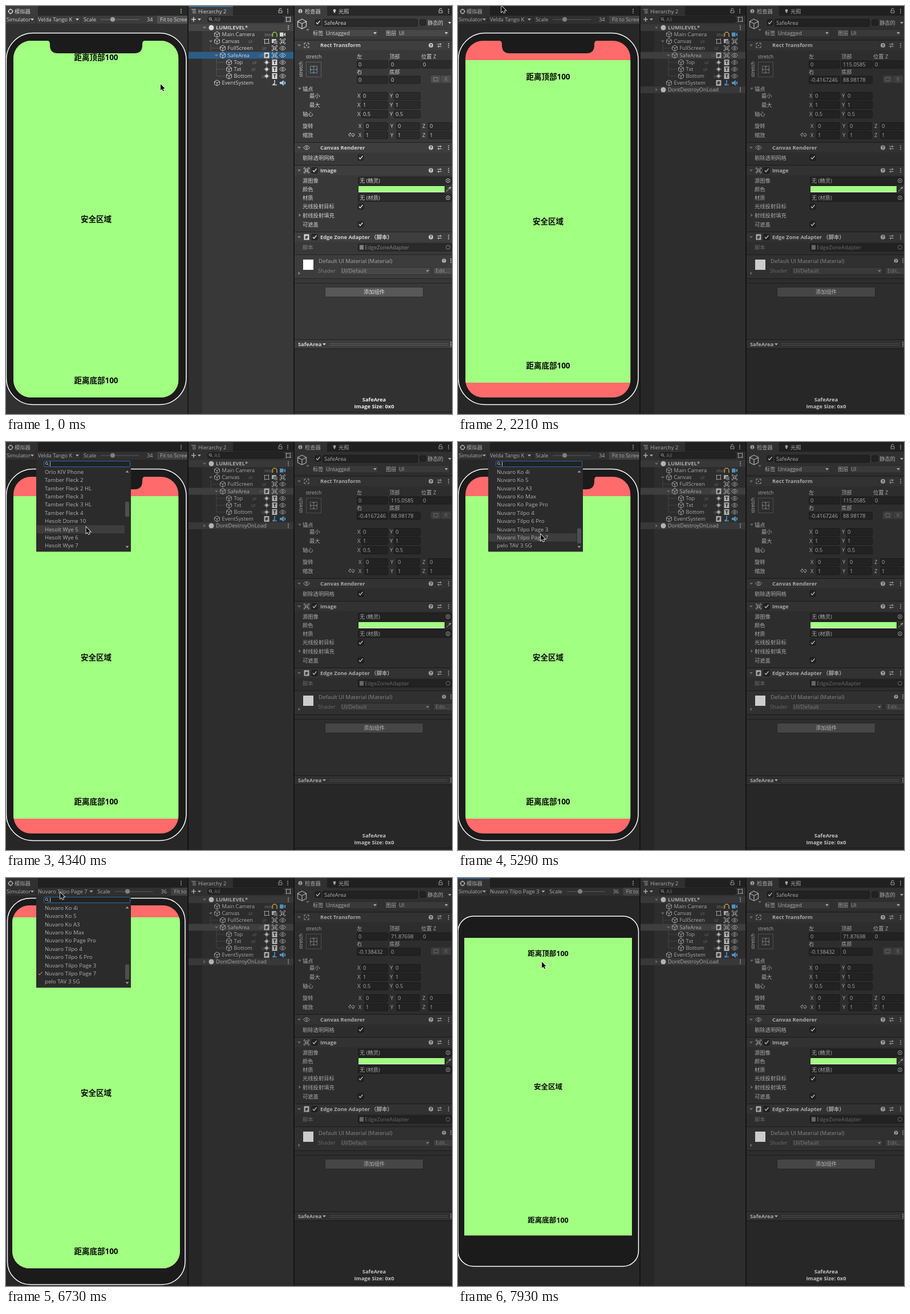
These frames come from a looping animation (782 px wide and 716 px high, 8000 ms). An HTML page with a canvas:

```html
<!DOCTYPE html>
<html lang="zh">
<head>
<meta charset="utf-8">
<style>
html, body { margin: 0; width: 100%; height: 100%; overflow: hidden; background: #191919; }
canvas { display: block; }
</style>
</head>
<body>
<canvas id="stage" width="782" height="716"></canvas>
<script>
const g = document.getElementById('stage').getContext('2d');
const FONT = "'Open Sans', 'Noto Sans CJK SC', 'Noto Sans CJK', sans-serif";
const GREEN = '#a1ff81', RED = '#ff6b6b', BODY = '#1b1b1b', INK = '#d2d2d2', DIM = '#848484';

const ICON = {
  cube: 'M0-5L4.5-2.5V2.5L0 5L-4.5 2.5V-2.5ZM-4.5-2.5L0 0L4.5-2.5M0 0V5',
  eye: 'M-5.5 0Q0-7 5.5 0Q0 7-5.5 0ZM1.5 0A1.5 1.5 0 1 1-1.5 0A1.5 1.5 0 1 1 1.5 0',
  image: 'M-4.5-2V-4.5H-2M2-4.5H4.5V-2M4.5 2V4.5H2M-2 4.5H-4.5V2M-2.5-2.5H2.5V2.5H-2.5ZM-2 2L0-1L2 2',
  lock: 'M-3 0H3V4H-3ZM-2 0V-2A2 2 0 0 1 2-2',
  dots: 'M-.8-4h1.6v1.7h-1.6zM-.8-.8h1.6v1.7h-1.6zM-.8 2.4h1.6v1.7h-1.6z',
  check: 'M-3 0L-1 2.5L3.5-3',
  down: 'M-3-1.5H3L0 2Z', right: 'M-1.5-3V3L2 0Z', up: 'M-3 1.5H3L0-2Z',
  sliders: 'M-4-2H4M-4 2H4M1.5-4V0M-1.5 0V4',
  find: 'M1.2-1A2 2 0 1 1-2.8-1A2 2 0 1 1 1.2-1M.6.6L3 3',
  rect: 'M-2-2H2V2H-2ZM-5 0H-2M2 0H5M0-5V-2M0 2V5',
  frame: 'M-3.5-3.5H3.5V3.5H-3.5ZM-5-3.5H-2M3.5-5V-2M5 3.5H2M-3.5 5V2',
  ears: 'M-4 3V0A4 4 0 0 1 4 0V3M-4 .5V4M4 .5V4',
  camera: 'M-5-3.5H1.5V3.5H-5ZM2.5-1L5-3.5V3.5L2.5 1Z',
  speaker: 'M-5-2H-2L2-5V5L-2 2H-5ZM3-2.5H5V2.5H3Z',
  stick: 'M0-4V2M-4 3.5H4M-1-4H1M-3 2H0',
  ring: 'M3.5 0A3.5 3.5 0 1 1-3.5 0A3.5 3.5 0 1 1 3.5 0',
  spread: 'M-4-4L-1-4M-4-4V-1M4-4H1M4-4V-1M-4 4H-1M-4 4V1M4 4H1M4 4V1M-.5-.5H.5V.5H-.5Z',
  link: 'M-1-2H-3A2 2 0 0 0-3 2H-1M1-2H3A2 2 0 0 1 3 2H1M-3-4L3 4'
};

const box = (x, y, w, h, color) => { g.fillStyle = color; g.fillRect(x, y, w, h); };

function round(x, y, w, h, r, fill, stroke, width = 1) {
  g.beginPath();
  g.roundRect(x, y, w, h, r);
  if (fill) { g.fillStyle = fill; g.fill(); }
  if (stroke) { g.strokeStyle = stroke; g.lineWidth = width; g.stroke(); }
}

function text(s, x, y, color = INK, size = 9.3, style = '', align = 'left') {
  g.font = `${style} ${size}px ${FONT}`;
  g.textAlign = align;
  g.fillStyle = color;
  g.fillText(s, x, y + size * .36);
}
const bold = (s, x, y, color) => text(s, x, y, color, 9.3, 'bold');

function shape(d, x, y, fill, stroke, width = 1) {
  g.save();
  g.translate(x, y);
  const p = new Path2D(d);
  if (stroke) { g.strokeStyle = stroke; g.lineWidth = width; g.stroke(p); }
  if (fill) { g.fillStyle = fill; g.fill(p); }
  g.restore();
}
const solid = (name, x, y, color = INK) => shape(ICON[name], x, y, color);
const line = (name, x, y, color = '#c4c4c4', width = 1) => shape(ICON[name], x, y, null, color, width);

function badge(s, x, y) {
  box(x - 4.5, y - 5, 9, 10, '#d8d8d8');
  text(s, x, y, '#222', 9, 'bold', 'center');
}

function check(x, y, on = true) {
  round(x - 5, y - 5, 10, 10, 2, '#2a2a2a', '#1c1c1c');
  if (on) line('check', x, y, '#e0e0e0', 1.4);
}

function field(x, y, w, s, color) {
  round(x + .5, y - 6.5, w - 1, 13, 2, '#2a2a2a', '#202020');
  text(s, x + 3, y, color);
}

function popup(x, y, w, s, color = INK) {
  round(x + .5, y - 6.5, w - 1, 13, 2, '#474747', '#303030');
  text(s, x + 3, y, color);
  solid('down', x + w - 6, y, color);
}

// Scrollable device list
const devices = ['Velda Tango K', 'Velda Tango KR', 'Velda Tango KT', 'Velda Tango KT Max',
  'Velda Chip Pouch 6th Gen', 'Velda Chip Pouch 7th Gen', 'Orlo KIV Phone',
  'Tamber Fleck 2', 'Tamber Fleck 2 HL', 'Tamber Fleck 3', 'Tamber Fleck 3 HL', 'Tamber Fleck 4', 'Hesolt Dome 10'];
for (const series of ['Hesolt Wye', 'Morvane Gil', 'Sundarq Halo'])
  for (let n = 5; n < 9; n++) devices.push(`${series} ${n}`);
for (const model of ['Ko 4i', 'Ko 5', 'Ko A3', 'Ko Max', 'Ko Page Pro', 'Tilpo 4', 'Tilpo 6 Pro', 'Tilpo Page 3', 'Tilpo Page 7'])
  devices.push(`Nuvaro ${model}`);
devices.push('pelo TAV 3 5G');

// body and screen: x, y, w, h, radius; safe: top and bottom edge
const phones = [
  { item: 0, body: [.5, 47.5, 315.5, 652, 47], screen: [13, 61, 289.5, 626, 31], safe: [95, 661],
    notch: 'M71 60Q77 61 77 67V69Q77 83 91 83H225Q239 83 239 69V67Q239 61 245 60Z',
    size: 13.5, gap: 29.5, shift: 0, knob: 187, scale: 34 },
  { item: 33, body: [2.5, 35.5, 311.5, 678, 40], screen: [11, 48, 294, 637, 30], safe: [69, 685],
    notch: 'M138 47Q147 49 149 55Q151 65 158 65Q165 65 167 55Q169 49 178 47Z',
    size: 13.5, gap: 29.5, shift: 24.5, knob: 213, scale: 36 },
  { item: 32, body: [0, 67, 316.5, 614.5, 27], screen: [11, 105, 294, 522.5, 0], safe: [105, 627.5],
    size: 12.5, gap: 27, shift: 24.5, knob: 214, scale: 36 }
];

// time, x, y
const mouse = [[0, 271, 137], [40, 271, 137], [333, 112, -14], [1070, 77, -14], [1190, 75, -1], [2200, 75, -1],
  [2630, 120, 25], [3250, 120, 25], [3720, 131, 134], [4080, 139, 149], [4960, 144, 150], [5290, 145, 162],
  [5860, 145, 162], [6660, 95, 25], [6730, 95, 25], [7510, 147, 147], [8000, 147, 147]];

function mouseAt(t) {
  const i = mouse.findIndex(k => k[0] > t), [a, b] = [mouse[i - 1], mouse[i]];
  const u = (t - a[0]) / (b[0] - a[0]);
  return [a[1] + (b[1] - a[1]) * u, a[2] + (b[2] - a[2]) * u];
}

function tabBar(x, w, active) {
  box(x, 0, w, 716, '#383838');
  box(x, 0, w, 17, '#282828');
  box(x, 0, active, 17, '#3c3c3c');
}

function simulator(phone) {
  tabBar(0, 318, 56);
  line('ring', 8, 9.5, INK, 1.4);
  shape('M-5 0H-2M2 0H5M0-5V-2M0 2V5', 8, 9.5, null, INK);
  text('模拟器', 15, 9.5);
  solid('dots', 307, 9);
  box(0, 17, 318, 14, '#3c3c3c');
  box(0, 31, 318, 685, '#313131');
  const s = phone.shift;
  text('Simulator', 1, 23.5);
  solid('down', 46, 23.5);
  text(devices[phone.item], 56, 23.5);
  solid('down', 125 + s, 23.5);
  for (const x of [52, 131 + s]) box(x, 17, 1, 14, '#2a2a2a');
  text('Scale', 136 + s, 23.5);
  box(166 + s, 23, 67, 1.5, '#606060');
  g.beginPath();
  g.arc(phone.knob, 23.5, 4, 0, 7);
  g.fillStyle = '#a0a0a0';
  g.fill();
  text(phone.scale, 247 + s, 23.5);
  box(265 + s, 17, 60, 14, '#505050');
  text('Fit to Screen', 270 + s, 23.5);
}

function hierarchy(play, run) {
  box(318, 0, 2, 716, '#191919');
  tabBar(320, 184, 78);
  shape('M-4-3H4M-2 0H4M-2 3H4', 329, 9, null, INK);
  text('Hierarchy 2', 337, 9.5);
  line('lock', 481, 8);
  solid('dots', 494, 9);
  box(320, 17, 184, 15, '#3c3c3c');
  shape('M-4 0H4M0-4V4', 329, 23.5, null, INK, 1.6);
  solid('down', 339, 23.5);
  round(353.5, 18.5, 134, 10, 4, '#2a2a2a', '#202020');
  line('find', 359, 23.5);
  text('All', 365, 23.5, DIM);
  line('frame', 495, 23.5);
  box(320, 32, 24, 684, '#2f2f2f');

  const scene = (s, y, open) => {
    box(320, y - 6, 184, 12, '#464646');
    solid(open ? 'down' : 'right', 348, y, DIM);
    g.beginPath();
    g.arc(360, y, 4.5, 0, 7);
    g.fillStyle = '#e0e0e0';
    g.fill();
    text(s, 368, y, INK, 9.3, open ? 'bold' : '');
    solid('dots', 495, y);
  };
  scene('LUMILEVEL*', 38, true);
  box(320, 80.5, 184, 12, play ? '#4d4d4d' : '#2c5d87');
  shape('M359 67V86H366M359 74H375M369 91V123H384M369 99H384M369 111H384', 0, 0, null, '#555');

  const node = (s, x, y, tag, tagX, open) => {
    if (open) solid('down', x - 11, y, DIM);
    line('cube', x, y);
    text(s, x + 8.5, y);
    text(tag, tagX, y, DIM, 7.5, 'italic');
  };
  node('Main Camera', 370, 50, 'Main', 453);
  node('Canvas', 370, 62, 'UI', 425, true);
  node('FullScreen', 380, 74, 'UI', 449);
  node('SafeArea', 380, 86.5, 'UI', 444, true);
  node('Top', 391, 99, 'UI', 432);
  node('Txt', 391, 111, 'UI', 430);
  node('Bottom', 391, 123, 'UI', 448);
  node('EventSystem', 370, 135, '', 0);

  const lit = (a, b) => run ? a : play ? '#d0d0d0' : b;
  line('ears', 471, 50, lit('#f0c050', '#8fd040'), 1.5);
  solid('camera', 485, 50, lit('#60b8f0', '#d8d8d8'));
  line('frame', 457, 62);
  shape('M-5-4H3V3H-5Z', 471, 62, '#d0d0d0');
  shape('M-1-1H5V5H-1Z', 471, 62, '#808080', '#333');
  line('image', 485, 62);
  for (const y of [74, 86.5]) line('image', 471, y);
  for (const y of [74, 86.5, 99, 111, 123]) line('eye', 485, y);
  badge('#', 457, 86.5);
  for (const y of [99, 111, 123]) {
    shape(ICON.rect, 457, y, '#d8d8d8', '#b0b0b0');
    badge('T', 471, y);
  }
  line('stick', 471, 135, lit('#60b8f0', '#d0d0d0'), 1.5);
  solid('speaker', 485, 135, lit('#60b8f0', '#9cc8ec'));
  if (run) {
    badge('#', 457, 135);
    scene('DontDestroyOnLoad', 147, false);
  }
  if (!play) box(320, 0, 78, 1.5, '#3a79bb');
}

function help(y) {
  shape('M4 0A4 4 0 1 1-4 0A4 4 0 1 1 4 0', 745, y, '#c4c4c4');
  text('?', 745, y, '#333', 7.5, 'bold', 'center');
  line('sliders', 760, y);
  solid('dots', 776, y);
}

function header(y, title, icon, toggle) {
  box(506, y - 9.5, 276, 18, '#3e3e3e');
  box(506, y - 9.5, 276, 1, '#1f1f1f');
  solid('down', 514, y, DIM);
  if (icon === '#') badge('#', 527, y); else line(icon, 527, y);
  if (toggle) check(541, y);
  bold(title, 551, y);
  help(y);
}

function inspector([top, right, bottom], play) {
  box(504, 0, 2, 716, '#191919');
  tabBar(506, 276, 57);
  shape(ICON.ring, 516, 9, '#c8c8c8');
  text('i', 516, 9, '#333', 7, 'bold', 'center');
  text('检查器', 524, 9.5);
  shape('M2.5-1A2.5 2.5 0 1 0-2.5-1Q-1 1-1 3H1Q1 1 2.5-1Z', 576, 9, '#c8c8c8');
  text('光照', 583, 9.5);
  line('lock', 762, 8);
  solid('dots', 776, 9);

  box(506, 17, 276, 39, '#3c3c3c');
  shape('M0-9L7.5-5V4L0 8L-7.5 4V-5ZM-7.5-5L0-1L7.5-5M0-1V8', 519, 32, null, '#c4c4c4', 1.4);
  solid('down', 529, 42, DIM);
  check(547, 29);
  field(555, 29.5, 167, 'SafeArea');
  check(731, 29, false);
  text('静态的', 739, 29.5);
  solid('down', 778, 29.5);
  text('标签', 538, 47.5);
  popup(558, 47.5, 95, 'Untagged');
  text('图层', 666, 47.5);
  popup(686, 47.5, 92, 'UI');

  header(69, 'Rect Transform', 'spread');
  text('stretch', 539.5, 89, INK, 8.6, '', 'center');
  g.save();
  g.translate(517, 111);
  g.rotate(-Math.PI / 2);
  text('stretch', 0, 0, INK, 8.6, '', 'center');
  g.restore();
  g.lineWidth = 1;
  g.strokeStyle = '#606060';
  g.strokeRect(526.5, 98.5, 26, 26);
  g.strokeStyle = '#808080';
  g.strokeRect(533.5, 105.5, 12, 12);
  shape('M-6 0H6M0-6V6M-4-2L-6 0L-4 2M4-2L6 0L4 2M-2-4L0-6L2-4M-2 4L0 6L2 4', 539.5, 111.5, null, play ? '#8c8c8c' : '#4f86ad');
  const cols = [615, 672, 728];
  ['左', '顶部', '位置 Z'].forEach((s, i) => text(s, cols[i], 88.5));
  ['0', top, '0'].forEach((s, i) => field(cols[i], 102.5, 55, s));
  ['右', '底部'].forEach((s, i) => text(s, cols[i], 116));
  [right, bottom].forEach((s, i) => field(cols[i], 129.5, 55, s));
  for (const x of [745, 763]) round(x, 122, 17, 13, 2, '#4c4c4c');
  shape('M-3.5-3H3.5V3H-3.5Z', 753.5, 128.5, null, DIM);
  text('R', 771.5, 128.5, DIM, 9, '', 'center');

  solid('down', 515, 145, DIM);
  text('锚点', 520, 145.5);
  [['最小', 532, 158, '0'], ['最大', 532, 173.5, '1'], ['轴心', 520, 190, '0.5']].forEach(([s, x, y, v]) => {
    text(s, x, y);
    text('X', 616, y);
    field(623, y, 47, v);
    text('Y', 673, y);
    field(680, y, 47, v);
  });
  [['旋转', 211, '0'], ['缩放', 226.5, '1']].forEach(([s, y, v]) => {
    text(s, 520, y);
    ['X', 'Y', 'Z'].forEach((axis, i) => {
      text(axis, 618 + i * 56, y);
      field(628 + i * 56, y, 42, v);
    });
  });
  line('link', 606, 226);

  header(248.5, 'Canvas Renderer', 'eye');
  text('剔除透明网格', 520, 266.5);
  check(622, 266);
  header(288.5, 'Image', 'image', true);
  [['源图像', 306.5, '无 (精灵)'], ['材质', 336.5, '无 (材质)']].forEach(([s, y, v]) => {
    text(s, 520, y);
    field(617, y, 165, v);
    line('ring', 775, y);
    box(774, y - 1, 2, 2, '#c4c4c4');
  });
  text('颜色', 520, 321.5);
  field(617, 321.5, 153, '');
  shape('M-4 4L1-1M0-3L3 0M1-2L3-4L4-3L2-1Z', 776, 321.5, '#c4c4c4', '#c4c4c4');
  text('光线投射目标', 520, 352);
  check(622, 352);
  solid('right', 515, 367, DIM);
  text('射线投射填充', 520, 367.5);
  text('可遮盖', 520, 383.5);
  check(622, 383);

  header(405.5, 'Edge Zone Adapter （脚本）', '#', true);
  text('脚本', 520, 423.5, DIM);
  field(617, 423.5, 165, '', DIM);
  box(620, 419.5, 7, 8, '#808080');
  text('EdgeZoneAdapter', 629, 423.5, DIM);
  line('ring', 775, 423.5, DIM);

  box(506, 437, 276, 41, '#3c3c3c');
  for (const y of [436, 478, 486]) box(506, y, 276, 1, '#222');
  box(521, 445, 18, 18, '#fff');
  solid('right', 514, 469, DIM);
  text('Default UI Material (Material)', 548, 447.5, '#aaa', 9.6);
  shape(ICON.ring, 768, 447, '#c4c4c4');
  text('?', 768, 447, '#333', 7, 'bold', 'center');
  solid('dots', 780, 447);
  text('Shader', 547, 465, DIM);
  popup(585, 465, 160, 'UI/Default', '#999');
  round(749, 458.5, 40, 13, 2, '#4a4a4a', '#303030');
  text('Edit...', 753, 465, '#999');

  round(559.5, 493.5, 172, 17, 2, '#585858', '#303030');
  text('添加组件', 645.5, 502, '#e0e0e0', 9.3, '', 'center');

  box(506, 585, 276, 131, '#313131');
  box(506, 585, 276, 16, '#3c3c3c');
  for (const y of [585, 601, 712]) box(506, y, 276, 1, '#1f1f1f');
  bold('SafeArea', 512, 593.5);
  solid('down', 558, 593.5);
  for (const y of [592, 595]) box(567, y, 207, 1, '#5a5a5a');
  solid('dots', 780, 593.5);
  text('SafeArea', 645.5, 690.5, '#f0f0f0', 9.3, 'bold', 'center');
  text('Image Size: 0x0', 645.5, 702.5, '#f0f0f0', 9.3, 'bold', 'center');
}

function device(p, run) {
  const [x, y, w, h, r] = p.screen;
  const [top, bottom] = run ? p.safe : [y, y + h];
  round(...p.body, BODY, '#fff', 1.5);
  g.save();
  round(x, y, w, h, r);
  g.clip();
  box(x, y, w, h, RED);
  box(x, top, w, bottom - top, GREEN);
  if (p.notch) shape(p.notch, 0, 0, BODY);
  g.restore();
  const label = (s, cy) => text(s, 158, cy, '#0a0a0a', p.size, 'bold', 'center');
  label('距离顶部100', top + p.gap);
  label('安全区域', (top + bottom) / 2);
  label('距离底部100', bottom - p.gap);
}

function dropdown(first, chosen, my) {
  box(53, 31, 166, 161.5, '#2b2b2b');
  const hover = Math.floor((my - 45) / 14.4);
  if (hover >= 0) box(54, 45.2 + hover * 14.4, 154, 14.4, '#3d3d3d');
  for (let i = 0; i < 10; i++) {
    const y = 52.4 + i * 14.4;
    text(devices[first + i], 68, y, '#b0b0b0', 9.7);
    if (first + i === chosen) line('check', 60, y, '#b0b0b0');
  }
  round(66.5, 33.5, 151, 10, 2, '#222', '#2f6ca8');
  line('find', 72, 38.5, '#b0b0b0');
  box(77, 34.5, 1, 8, '#c0c0c0');
  solid('up', 212.5, 52, '#a0a0a0');
  solid('down', 212.5, 184, '#a0a0a0');
  round(209, 90 + first * 2.46, 7, 26.5, 2, '#4f4f4f');
}

function draw(now) {
  const t = now % 8000;
  const play = t >= 930, run = t >= 1390;
  const stage = t < 5560 ? 0 : t < 7650 ? 1 : 2;
  const open = (t >= 2900 && t < 5490) || (t >= 6730 && t < 7580);
  const [mx, my] = mouseAt(t);

  simulator(phones[stage]);
  hierarchy(play, run);
  inspector(!run ? ['0', '0', '0'] : stage ? ['71.87698', '-0.138432', '0'] : ['115.0585', '-0.4167246', '88.98178'], play);
  if (play) box(0, 0, 782, 716, 'rgba(0,0,0,.2)');
  if (t >= 2830 && !open) box(0, 0, 56, 1.5, '#2f6196');
  box(618, 316, 151, 10, GREEN);
  box(618, 326, 151, 1, '#fff');

  g.save();
  g.beginPath();
  g.rect(0, 31, 318, 685);
  g.clip();
  device(phones[stage], run);
  g.restore();

  if (open) {
    const scroll = Math.min(1, Math.max(0, (t - 4140) / 810));
    dropdown(Math.round(25 * scroll), phones[stage].item, my);
  }
  shape('M0 0V11L2.5 8.8L4.3 12.6L6 11.8L4.3 8.1H7.8Z', mx, my, '#0a0a0a', '#f4f4f4', 1.6);
  requestAnimationFrame(draw);
}
requestAnimationFrame(draw);
</script>
</body>
</html>
```
